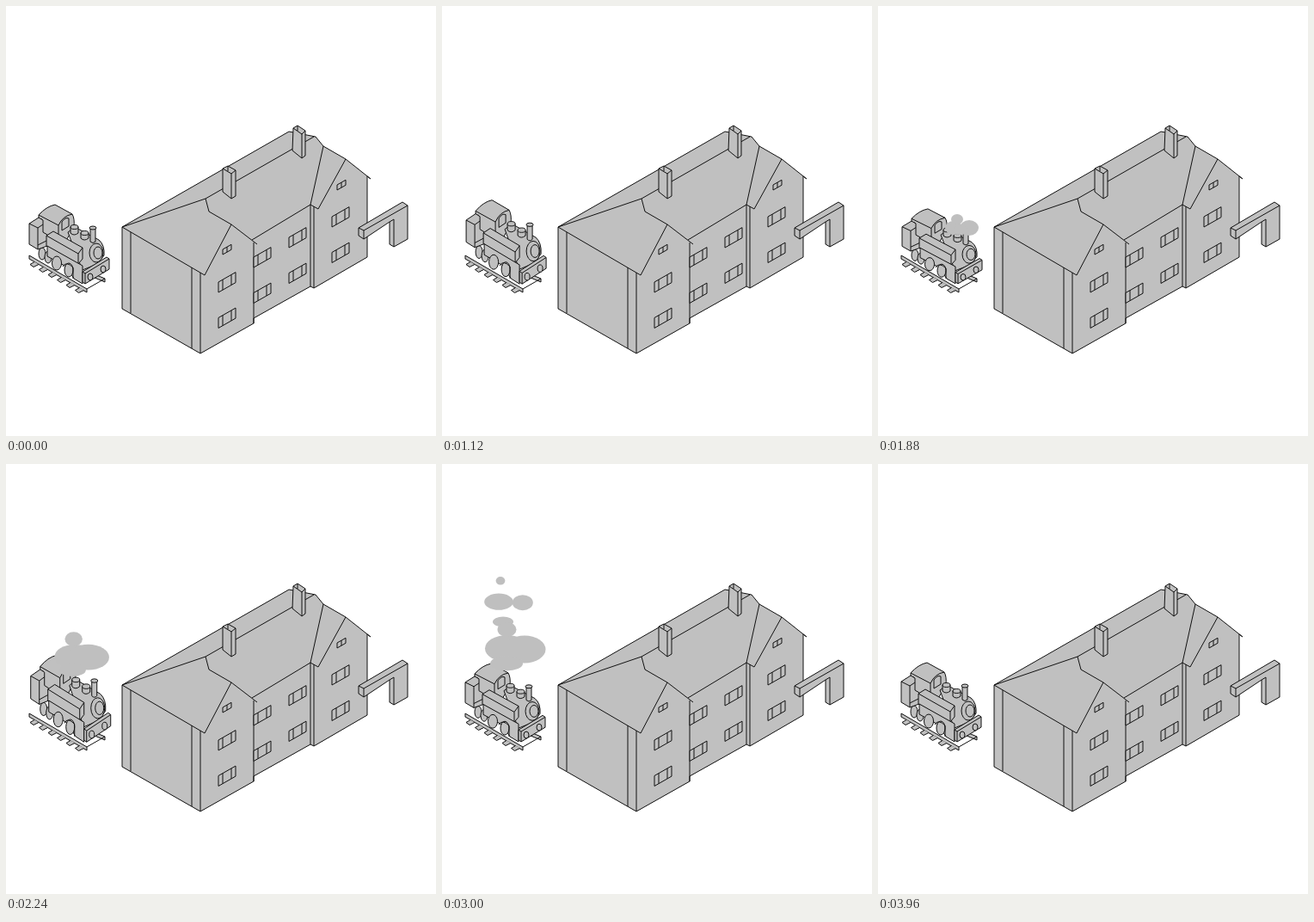
An HTML page that plays this animation: 500 px wide and 500 px high, repeating every 4000 ms.

```html
<!DOCTYPE html>
<html lang="en">
<head>
<meta charset="utf-8">
<style>
  html, body { margin: 0; width: 100%; height: 100%; overflow: hidden; background: #fff; }
  svg { display: block; width: 100vw; height: 100vh; }
  path, ellipse { fill: #c0c0c0; stroke: #111; stroke-width: 1; stroke-linejoin: round; vector-effect: non-scaling-stroke; }
  .line { fill: none; }
  .smoke ellipse { stroke: none; fill: #bfbfbf; }
</style>
</head>
<body>
<svg viewBox="0 0 500 500">
  <g id="house">
    <path d="M135 257L329 146L360 152L369 163L395 178L424 201L420 198V292L358 328L354 326L288 363V369L226 404L135 352Z"/>
    <path class="line" d="M135 257L231 313L262 254L292 277M135 257L232 224L236 239L262 254M232 224L358 152
      M369 163L354 231L363 236L395 178M286 272L354 231V326M358 233V328
      M145 263V357M216 304V398M226 310V404M288 275V369"/>
    <path d="M252 189L258 186L267 191V221L262 224L252 216Z"/>
    <path class="line" d="M252 189L262 195L267 191M262 195V224M258 186V192"/>
    <path d="M334 142L339 139L348 145V174L344 177L333 168Z"/>
    <path class="line" d="M334 142L344 149L348 145M344 149V177M339 139V145"/>
  </g>
  <g id="arch">
    <path d="M410 258L461 228L467 232V271L451 280L446 277V251L416 271L410 267Z"/>
    <path class="line" d="M410 258L416 261L467 232M416 261V271M446 251L451 248V280"/>
  </g>
  <g id="track">
    <path d="M27 290L94 329V333L27 294Z"/>
    <path d="M96 309L115 317V321L96 313Z"/>
    <path class="line" d="M94 329L115 317"/>
  </g>
  <g id="engine">
    <ellipse cx="42" cy="288" rx="4" ry="7"/>
    <ellipse cx="49" cy="292" rx="4" ry="7"/>
    <path d="M38 243Q47 233 57 231L77 242Q80 247 79 257L68 276L43 278L38 268Z"/>
    <path class="line" d="M38 243L61 255Q66 244 77 242M61 255V268M41 247V251M65 251Q69 245 73 247V256L65 261Z"/>
    <path d="M27 253L38 246L43 249V263L48 266V279L37 283L27 277Z"/>
    <path class="line" d="M27 253L37 258V283M37 258L43 254M37 278L47 273"/>
    <path d="M72 263L80 257L108 272Q115 278 114 290L106 300L89 307L82 290Z"/>
    <path d="M75 257V264Q79 268 84 264V257Z"/>
    <ellipse cx="79.500" cy="257" rx="4.500" ry="2.500"/>
    <path d="M87 264V270Q91 274 96 270V264Z"/>
    <ellipse cx="91.500" cy="264" rx="4.500" ry="2.500"/>
    <path d="M98 258V274Q101 277 104 274V258Z"/>
    <ellipse cx="101" cy="258" rx="4" ry="2"/>
    <path d="M47 267L55 262L89 281V294L84 300L47 279Z"/>
    <path class="line" d="M47 267L84 288L89 281M84 288V300"/>
    <ellipse cx="105" cy="287" rx="8" ry="11"/>
    <ellipse cx="107" cy="287" rx="5" ry="7"/>
    <path d="M48 279L89 302V323L79 317L70 303L48 291Z"/>
    <ellipse cx="59" cy="299" rx="5.500" ry="8"/>
    <ellipse cx="73" cy="307" rx="5" ry="8"/>
    <path d="M89 309L117 292L120 294V306L92 323L89 321Z"/>
    <path class="line" d="M89 309L92 311L120 294M92 311V323M66 303Q70 296 78 304V317"/>
    <ellipse cx="98" cy="315" rx="3" ry="4"/>
    <ellipse cx="113" cy="306" rx="3" ry="4"/>
  </g>
</svg>
<script>
const svg = document.querySelector('svg');
const engine = document.getElementById('engine');

function add(tag, parent, attrs = {}) {
  const node = document.createElementNS('http://www.w3.org/2000/svg', tag);
  for (const name in attrs) node.setAttribute(name, attrs[name]);
  parent.append(node);
  return node;
}

// A pane row follows the slope of the front wall.
function pane(x, y, width, height, bars) {
  const drop = u => y - u * 0.57;
  let d = `M${x} ${y}L${x + width} ${drop(width)}v${height}L${x} ${y + height}Z`;
  for (const u of bars) d += `M${x + u} ${drop(u)}v${height}`;
  add('path', document.getElementById('house'), { d });
}
for (const [x, y] of [[247, 321], [288, 292], [329, 269], [379, 245]])
  for (const dy of [0, 41.5]) pane(x, y + dy, 20, 12, [5, 15]);
pane(252, 283, 10, 6, [5]);
pane(385, 208, 10, 6, [5]);

for (let i = 0; i < 6; i++)
  add('path', document.getElementById('track'), { d: `M${33 + i * 10.5} ${297.5 + i * 6}l-5 3l4 3l6 -3` });

function sample(keys, time, ease = u => u) {
  if (time <= keys[0][0]) return keys[0].slice(1);
  for (let i = 1; i < keys.length; i++) {
    const [a, b] = [keys[i - 1], keys[i]];
    if (time < b[0]) {
      const u = ease((time - a[0]) / (b[0] - a[0]));
      return a.slice(1).map((v, j) => v + (b[j + 1] - v) * u);
    }
  }
  return keys[keys.length - 1].slice(1);
}

// Age, centre and radii of each puff in a cloud.
const puffs = [
  [[0, 101, 263, 0, 0], [80, 88, 258, 10, 8], [240, 88, 240, 21, 12], [880, 63, 189, 30, 19], [1000, 66, 175, 28, 16], [1500, 66, 138, 0, 0]],
  [[0, 101, 263, 0, 0], [80, 106, 258, 11, 9], [240, 95, 240, 24, 13], [880, 97, 191, 25, 19], [1000, 95, 176, 20, 15], [1500, 92, 139, 0, 0]],
  [[0, 101, 263, 0, 0], [80, 92, 248, 7, 6], [240, 84, 222, 9, 8], [880, 67, 163, 13, 9], [1000, 68, 149, 9, 8], [1500, 68, 116, 0, 0]],
  [[0, 101, 263, 0, 0], [80, 96, 261, 10, 5], [240, 81, 252, 10, 6], [880, 69, 212, 28, 11], [1000, 71, 199, 20, 10], [1500, 71, 160, 0, 0]]
];
const clouds = [1800, 2440].map(start => {
  const group = add('g', svg, { class: 'smoke' });
  return { start, nodes: puffs.map(() => add('ellipse', group)) };
});

// Time, vertical stretch and sideways shift of the engine.
const bounce = [[880, 1, 0], [1400, 1.135, 2.5], [1640, 1.14, 2.5], [1880, 0.945, 1],
  [2040, 0.88, 0], [2300, 1.13, 2], [2680, 0.88, 0], [3080, 1, 0]];
const smooth = u => u * u * (3 - 2 * u);

function draw(now) {
  const time = Math.floor(now % 4000 / 40) * 40;
  const [stretch, shift] = sample(bounce, time, smooth);
  engine.setAttribute('transform', `translate(${shift} ${320 * (1 - stretch)}) scale(1 ${stretch})`);
  for (const { start, nodes } of clouds)
    nodes.forEach((node, i) => {
      const values = sample(puffs[i], time - start);
      ['cx', 'cy', 'rx', 'ry'].forEach((name, j) => node.setAttribute(name, values[j]));
    });
  requestAnimationFrame(() => draw(performance.now() - begin));
}
const begin = performance.now();
draw(0);
</script>
</body>
</html>
```
